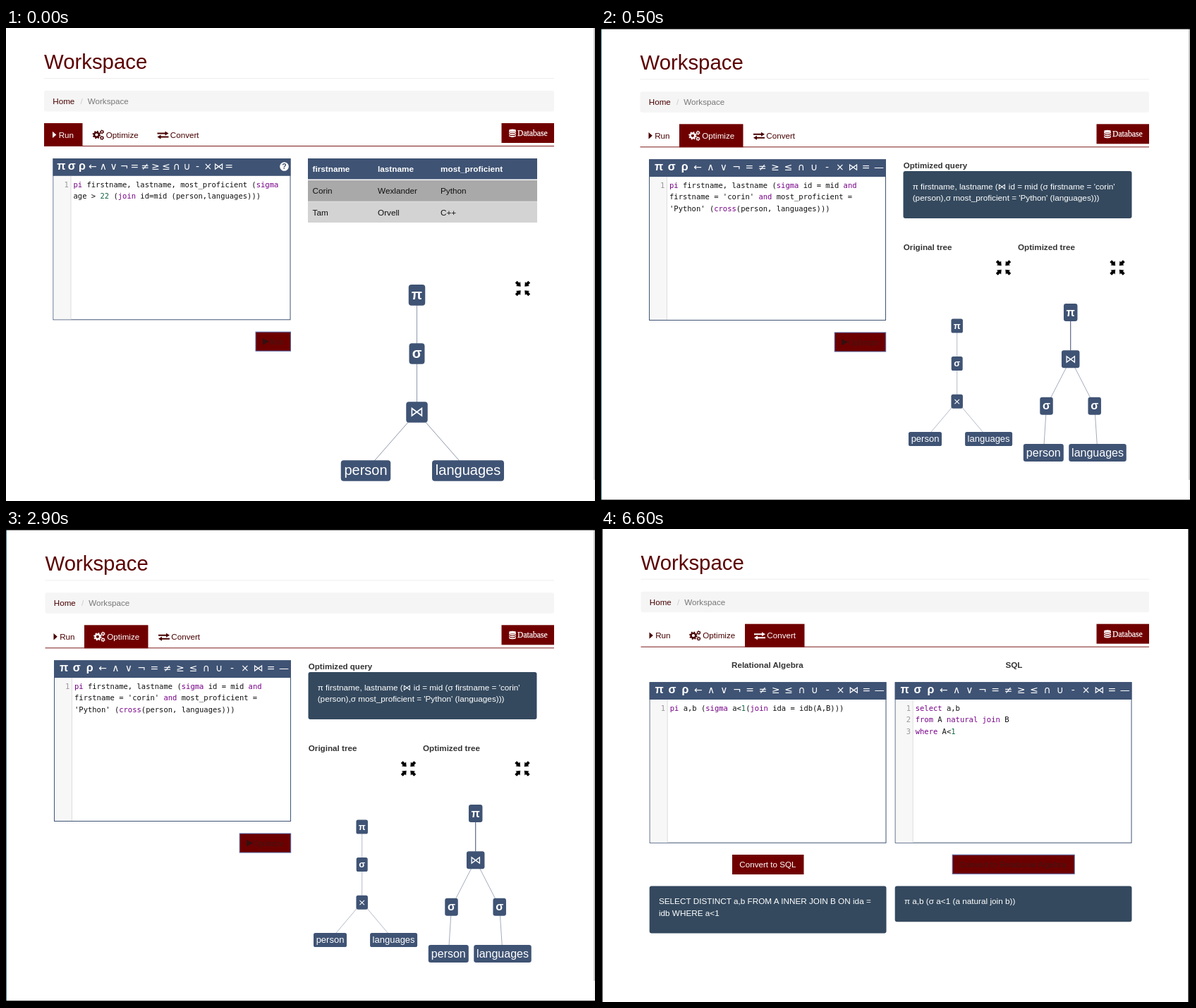
These frames come from a looping animation (835 px wide and 671 px high, 8 s). An HTML page:

```html
<!DOCTYPE html>
<html lang="en">
<head>
<meta charset="utf-8">
<title>Workspace</title>
<style>
  html, body { margin: 0; width: 100%; height: 100%; overflow: hidden; background: #fff; }
  svg { display: block; width: 100vw; height: 100vh; }
  text { white-space: pre; font-family: "Liberation Sans", Arial, "DejaVu Sans", sans-serif; }
  .mono { font-family: "DejaVu Sans Mono", monospace; }
  .serif { font-family: "Liberation Serif", "DejaVu Sans", serif; }
  .sym { font-family: "DejaVu Sans", sans-serif; }
  .b { font-weight: bold; }
  .mid { text-anchor: middle; }
</style>
</head>
<body>
<svg id="stage" viewBox="0 0 835 671" preserveAspectRatio="none"></svg>
<script>
const NAVY = '#3f5374', SLATE = '#34495e', MAROON = '#700000', DARK = '#480000';
const SIZE = 11.65, RIGHT = 777;
const SYMBOLS = 'πσρ←∧∨¬=≠≥≤∩∪-×⋈=—';

const esc = s => s.replace(/&/g, '&amp;').replace(/</g, '&lt;');
const rect = (x, y, w, h, fill, r = 0, extra = '') =>
  `<rect x="${x}" y="${y}" width="${w}" height="${h}" rx="${r}" fill="${fill}" ${extra}/>`;
const line = (x1, y1, x2, y2, stroke, w = 1) =>
  `<line x1="${x1}" y1="${y1}" x2="${x2}" y2="${y2}" stroke="${stroke}" stroke-width="${w}"/>`;
const text = (x, y, s, fill = '#222', cls = '', size = SIZE) =>
  `<text x="${x}" y="${y}" fill="${fill}" class="${cls}" font-size="${size}">${esc(s)}</text>`;
const at = (x, y, body) => `<g transform="translate(${x} ${y})">${body}</g>`;

function gear(x, y, r, teeth, color) {
  const step = Math.PI * 2 * r / teeth;
  return `<g fill="none" stroke="${color}">` +
    `<circle cx="${x}" cy="${y}" r="${r * 0.68}" stroke-width="${r * 0.5}"/>` +
    `<circle cx="${x}" cy="${y}" r="${r}" stroke-width="${r * 0.36}" ` +
    `stroke-dasharray="${step * 0.5} ${step * 0.5}"/></g>`;
}

const gears = (x, y, c) => at(x, y,
  gear(5.7, 7.5, 4.9, 8, c) + gear(13.3, 3.4, 2.6, 6, c) + gear(13.3, 11.9, 2.6, 6, c));

const swap = (x, y, c) => at(x, y,
  `<path fill="${c}" d="M0 2h11V0l5 3-5 3V4H0zM16 7H5V5L0 8l5 3V9h11z"/>`);

const caret = (x, y, c) => at(x, y, `<path fill="${c}" d="M0 0L5.3 4.7 0 9.4z"/>`);

function cylinder(x, y) {
  const bands = [2.6, 5.4, 8.2].map(b =>
    `<path d="M0 ${b}q5 2.4 10 0v1.7q-5 2.6-10 0z"/>`).join('');
  return at(x, y, `<g fill="#fff"><ellipse cx="5" cy="1.5" rx="5" ry="1.7"/>${bands}</g>`);
}

function compress(x, y) {
  const arrow = 'M2.8 2.8L9.5 3.4 8 5l2.7 2.9-2.8 2.8L5 8 3.4 9.5z';
  return at(x, y, [[1, 1], [-1, 1], [1, -1], [-1, -1]].map(([a, b]) =>
    `<path d="${arrow}" transform="scale(${a} ${b})"/>`).join(''));
}

// Heading, breadcrumb and tab bar shared by all three pages
function chrome(x, y, active) {
  const tabs = [[x, 54.5], [x + 55.5, 90.5], [x + 147.5, 84.5]];
  const ink = i => i === active ? '#fff' : DARK;
  const [tx, tw] = tabs[active];
  return text(x, y + 58, 'Workspace', '#5c0000', '', 29.35) +
    line(x, y + 71.5, RIGHT, y + 71.5, '#eee') +
    rect(x, y + 89, RIGHT - x, 29.5, '#f5f5f5', 3) +
    text(x + 12.3, y + 108, 'Home', DARK) +
    text(x + 51.5, y + 108, '/', '#ccc') +
    text(x + 61.7, y + 108, 'Workspace', '#777') +
    rect(tx, y + 135, tw, 33, MAROON) +
    line(x, y + 167.5, RIGHT, y + 167.5, '#7c1a1a') +
    caret(x + 12, y + 146.7, ink(0)) + text(x + 20.7, y + 155.5, 'Run', ink(0)) +
    gears(x + 68.7, y + 144, ink(1)) + text(x + 87.8, y + 155.5, 'Optimize', ink(1)) +
    swap(x + 160.5, y + 146.5, ink(2)) + text(x + 178.8, y + 155.5, 'Convert', ink(2)) +
    rect(702.5, y + 135, 74.5, 28, MAROON) + cylinder(713, y + 143.7) +
    `<g stroke="#fff" stroke-width=".25">${text(725, y + 153, 'Database', '#fff', 'serif')}</g>`;
}

function highlight(s) {
  return esc(s).replace(/\b(pi|sigma|join|and|cross|select|from|natural|where)\b|\b\d+\b/g,
    (m, word) => `<tspan fill="${word ? '#770088' : '#116644'}">${m}</tspan>`);
}

function editor(x, y, w, h, lines, { pitch = 18.35, first = 14, count = 18, numbered = false } = {}) {
  let out = rect(x + 0.5, y + 0.5, w - 1, h - 1, '#fff', 0, `stroke="${NAVY}"`) +
    rect(x + 1, y + 25, 24.5, h - 26, '#f7f7f7') +
    line(x + 25.5, y + 25, x + 25.5, y + h - 1, '#ddd') +
    rect(x, y, w, 24.8, NAVY);
  [...SYMBOLS].slice(0, count).forEach((s, i) => {
    const greek = i < 3;
    out += text(x + first + i * pitch, y + 16, s, '#fff',
      greek ? 'mid b' : 'mid sym', greek ? 16 : 14);
  });
  lines.forEach((s, i) => {
    const ly = y + 40.7 + i * 16.4;
    if (numbered || i === 0) out += text(x + 16, ly, String(i + 1), '#999', 'mono', 10.5);
    out += `<text x="${x + 29}" y="${ly}" class="mono" font-size="10.5" fill="#111">${highlight(s)}</text>`;
  });
  return out;
}

function focused(x, y, w, label, serif = true) {
  const body = serif
    ? at(x + 10.5, y + 9.5, '<path fill="#321010" d="M0 0L9 4.6 0 9.2z"/>') +
      text(x + 19.8, y + 18, label, '#421414', 'serif')
    : text(x + 10.3, y + 18.5, label, '#421414');
  return rect(x + 0.5, y + 0.5, w - 1, 27, '#6c0000', 0, 'stroke="#5768a8"') + body;
}

// Nodes are [label, cx, cy, width]; links join node indexes
function tree(size, h, nodes, links, stroke) {
  const wires = links.map(([a, b]) =>
    line(nodes[a][1], nodes[a][2], nodes[b][1], nodes[b][2], stroke)).join('');
  return wires + nodes.map(([s, x, y, w]) => {
    const cls = 'πσ'.includes(s) ? 'mid b' : '⋈×'.includes(s) ? 'mid sym' : 'mid';
    return rect(x - w / 2, y - h / 2, w, h, NAVY, size / 5) +
      text(x, y + size * 0.32, s, '#fff', cls, size);
  }).join('');
}

const panel = (x, y, w, h, lines) => rect(x, y, w, h, SLATE, 3) +
  lines.map((s, i) => text(x + 13.2, y + 25.5 + i * 16.5, s, '#fff', '', 11.75)).join('');

function table() {
  const rows = [
    ['firstname', 'lastname', 'most_proficient'],
    ['Corin', 'Wexlander', 'Python'],
    ['Tam', 'Orvell', 'C++']
  ];
  const fills = [NAVY, '#a9a9a9', '#d3d3d3'], tops = [185, 216, 246.2];
  const cols = [434.5, 527, 616];
  return rows.map((row, i) => rect(428, tops[i], 325, i ? 29.8 : 29.5, fills[i]) +
    row.map((s, j) => text(cols[j], tops[i] + (i ? 19.3 : 18.7), s,
      i ? '#111' : '#fff', i ? '' : 'b', 11.75)).join('')).join('');
}

const edge = line(834, 0, 834, 641, '#8c8c8c') + line(834, 641, 834, 671, '#e4e4e4');

const runPage = chrome(54, 0, 0) +
  editor(66.5, 185, 337, 229.3, [
    'pi firstname, lastname, most_proficient (sigma',
    'age > 22 (join id=mid (person,languages)))'
  ], { pitch: 14.87, first: 11.8, count: 17 }) +
  '<circle cx="394.5" cy="196.5" r="6.3" fill="#fff"/>' +
  text(394.5, 200.3, '?', NAVY, 'mid b', 10.5) +
  focused(353.5, 430.7, 50.5, 'Run') +
  table() + compress(732.5, 369.5) +
  tree(20, 29.7, [
    ['π', 582.5, 378.8, 23.5], ['σ', 582.5, 462, 22], ['⋈', 582.5, 545, 30.5],
    ['person', 510, 628, 70.5], ['languages', 655, 628, 102]
  ], [[0, 1], [1, 2], [2, 3], [2, 4]], '#8f98ab') + edge;

const optimizePage = chrome(55.5, 1.3, 1) +
  editor(68, 186.3, 336, 228.7, [
    'pi firstname, lastname (sigma id = mid and',
    "firstname = 'corin' and most_proficient =",
    "'Python' (cross(person, languages)))"
  ]) +
  focused(330.7, 431.5, 73.5, 'Optimize') +
  text(428.8, 199, 'Optimized query', '#333', 'b', 11.55) +
  panel(428.5, 203, 324, 67, [
    "π firstname, lastname (⋈ id = mid (σ firstname = 'corin'",
    "(person),σ most_proficient = 'Python' (languages)))"
  ]) +
  text(428.8, 315, 'Original tree', '#333', 'b') +
  text(591, 315, 'Optimized tree', '#333', 'b') +
  compress(570.5, 340) + compress(732, 340) +
  tree(13, 20, [
    ['π', 504.7, 422.5, 16.5], ['σ', 504.7, 476, 16], ['×', 504.7, 529.7, 16.5],
    ['person', 459.5, 583, 47], ['languages', 549.6, 583, 67]
  ], [[0, 1], [1, 2], [2, 3], [2, 4]], '#b4bac8') +
  tree(16, 25, [
    ['π', 665.7, 403.5, 19.5], ['⋈', 665.7, 469.8, 25.5], ['σ', 631.5, 536.3, 18.5],
    ['σ', 699.7, 536.3, 18.5], ['person', 627.3, 602.5, 57], ['languages', 704, 602.5, 81.5]
  ], [[0, 1], [1, 2], [1, 3], [2, 4], [3, 5]], '#a3abbc') +
  line(665.7, 416, 665.7, 457.5, '#59657e') + edge +
  rect(0, 0, 1, 671, '#4b8790') + rect(0, 0, 835, 1.6, '#000') + rect(0, 669.2, 835, 1.8, '#000');

const convertPage = chrome(56.5, -0.3, 2) +
  text(185, 196.8, 'Relational Algebra', '#333', 'b') +
  text(573.5, 196.8, 'SQL', '#333', 'b') +
  editor(68.7, 217.2, 335.8, 228.5, ['pi a,b (sigma a<1(join ida = idb(A,B)))']) +
  editor(416.7, 217.2, 335.8, 228.5,
    ['select a,b', 'from A natural join B', 'where A<1'], { numbered: true }) +
  rect(186, 462, 101.5, 28, MAROON) + text(196.3, 480.3, 'Convert to SQL', '#fff') +
  focused(497.7, 461.7, 174, 'Convert to Relational Algebra', false) +
  panel(68.7, 506.5, 335.8, 67, [
    'SELECT DISTINCT a,b FROM A INNER JOIN B ON ida =',
    'idb WHERE a<1'
  ]) +
  panel(416.7, 506.5, 335.8, 50.7, ['π a,b (σ a<1 (a natural join b))']) +
  rect(0, 0, 2.2, 671, '#000') + rect(832.5, 0, 2.5, 671, '#000');

const LOOP = 8000, STARTS = [0, 500, 4500];
const stage = document.getElementById('stage');
stage.innerHTML = rect(0, 0, 835, 671, '#fff') +
  [runPage, optimizePage, convertPage].map(p => `<g class="page">${p}</g>`).join('');
const pages = [...stage.querySelectorAll('.page')];

function draw(ms) {
  const t = ms % LOOP;
  const current = STARTS.filter(s => t >= s).length - 1;
  pages.forEach((p, i) => p.setAttribute('display', i === current ? 'inline' : 'none'));
}

const origin = performance.now();
function tick() {
  draw(performance.now() - origin);
  requestAnimationFrame(tick);
}
tick();
</script>
</body>
</html>
```
